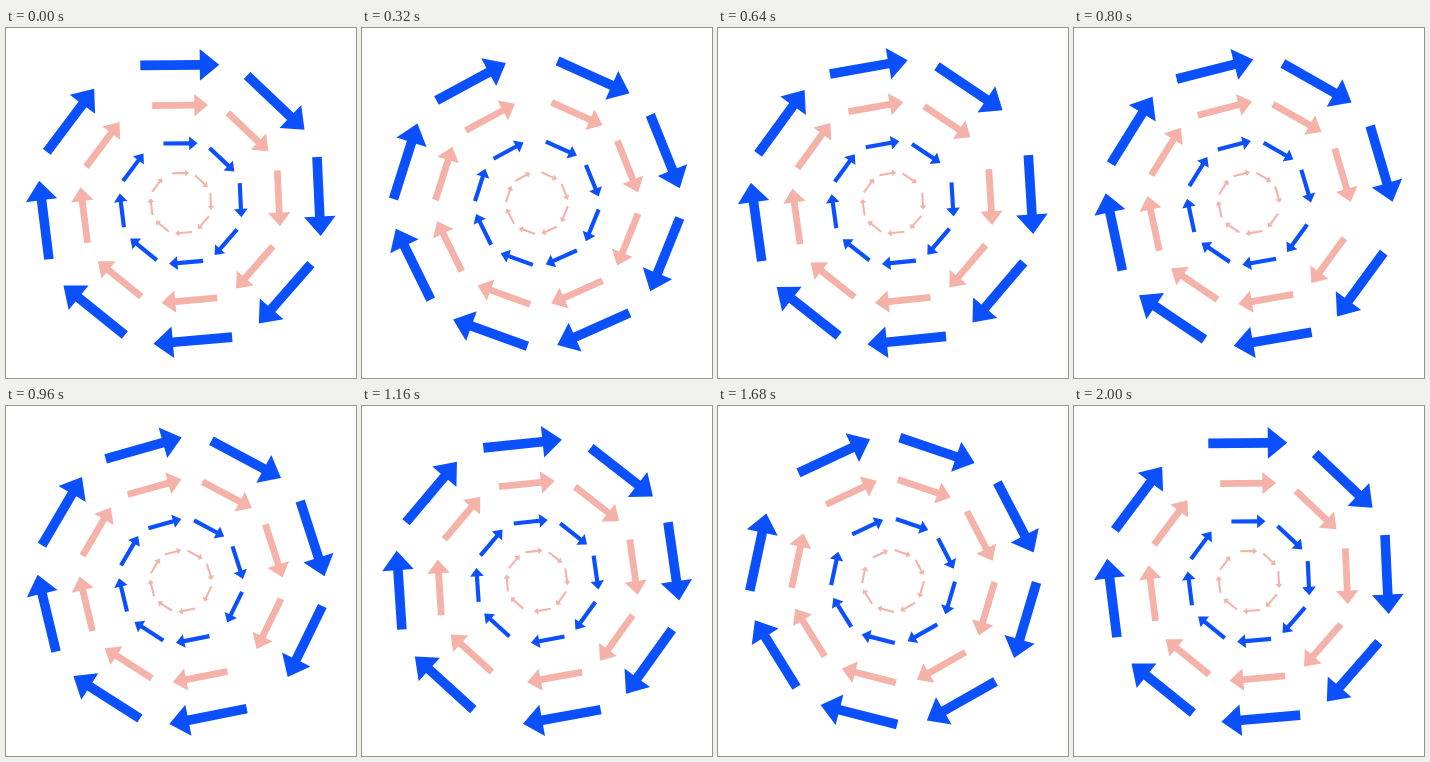
Write an HTML page that moves like this. It is 350 by 350 pixels and loops after 2080 ms.

```html
<!DOCTYPE html>
<html lang="en">
<head>
<meta charset="utf-8">
<title>Rotating arrow rings</title>
<style>
  html, body { margin: 0; height: 100%; overflow: hidden; background: #fff; }
  svg { display: block; width: 100%; height: 100%; }
</style>
</head>
<body>
<svg viewBox="0 0 350 350"><g id="wheel"></g></svg>
<script>
const BLUE = '#0b50ff', PINK = '#f4b2a8';
const RADIUS = 138, COUNT = 8, SPACING = 43.9, START = -0.5;
const STEP = 40, SPIN = 2000, LOOP = 2080;
const ARROW = 'M-39.5-4.8H20V-15.8L39.5 0 20 15.8V4.8H-39.5Z';
const rings = [[1, BLUE], [0.708, PINK], [0.432, BLUE], [0.216, PINK]];
const wheel = document.getElementById('wheel');

function ring([scale, color]) {
  let arrows = '';
  for (let i = 0; i < COUNT; i++) {
    arrows += `<path d="${ARROW}" transform="rotate(${START + i * SPACING}) translate(0 ${-RADIUS})"/>`;
  }
  return `<g fill="${color}" transform="scale(${scale})">${arrows}</g>`;
}

wheel.innerHTML = rings.map(ring).join('');

// One eased turn per loop, stepped at 25 frames per second
function draw() {
  const time = Math.floor(performance.now() % LOOP / STEP) * STEP;
  const u = Math.min(time / SPIN, 1);
  const angle = 360 * u * u * (3 - 2 * u);
  wheel.setAttribute('transform', `translate(175 175) rotate(${angle})`);
  requestAnimationFrame(draw);
}
draw();
</script>
</body>
</html>
```
